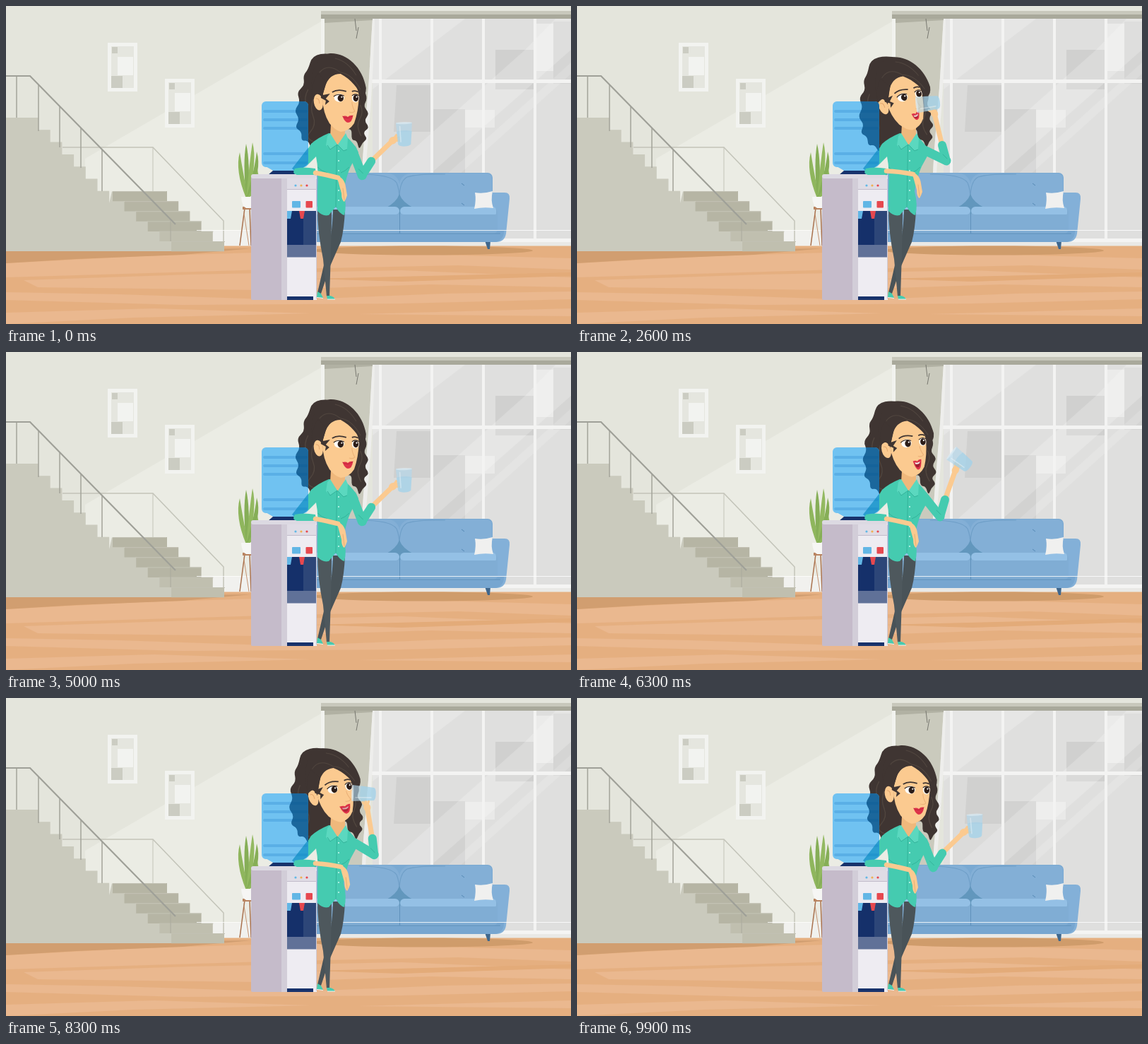
Recreate the animation shown at these times as an HTML page with a canvas. Size 800 px wide and 450 px high, loop 10 s.

```html
<!DOCTYPE html>
<html lang="en">
<head>
<meta charset="utf-8">
<title>Water break</title>
<style>
html, body { margin: 0; width: 100%; height: 100%; overflow: hidden; background: #e4e5dc; }
canvas { display: block; width: 800px; height: 450px; }
</style>
</head>
<body>
<canvas id="stage" width="800" height="450"></canvas>
<script>
const stage = document.getElementById('stage').getContext('2d');
let g = stage;

// --- drawing helpers ---
function rect(x1, y1, x2, y2, color, r = 0) {
  g.fillStyle = color;
  g.beginPath();
  g.roundRect(x1, y1, x2 - x1, y2 - y1, r);
  g.fill();
}
function poly(p, color) {
  g.fillStyle = color;
  g.beginPath();
  for (let i = 0; i < p.length; i += 2) g.lineTo(p[i], p[i + 1]);
  g.fill();
}
function line(p, color, w = 1) {
  g.strokeStyle = color;
  g.lineWidth = w;
  g.beginPath();
  for (let i = 0; i < p.length; i += 2) g.lineTo(p[i], p[i + 1]);
  g.stroke();
}
function oval(x, y, rx, ry, color, a = 0) {
  g.fillStyle = color;
  g.beginPath();
  g.ellipse(x, y, rx, ry, a, 0, 7);
  g.fill();
}
// closed smooth outline through the midpoints of a polygon
function blob(p, color) {
  const n = p.length / 2, at = i => [p[(i % n) * 2], p[(i % n) * 2 + 1]];
  const mid = (a, b) => [(a[0] + b[0]) / 2, (a[1] + b[1]) / 2];
  g.fillStyle = color;
  g.beginPath();
  g.moveTo(...mid(at(0), at(1)));
  for (let i = 1; i <= n; i++) g.quadraticCurveTo(...at(i), ...mid(at(i), at(i + 1)));
  g.fill();
}
function path(d, color, w) {
  const p = new Path2D(d);
  if (w) { g.strokeStyle = color; g.lineWidth = w; g.stroke(p); }
  else { g.fillStyle = color; g.fill(p); }
}
// turn about (x, y) and shift by (dx, dy)
function around(x, y, deg, dx, dy, draw) {
  g.save();
  g.translate(x + dx, y + dy);
  g.rotate(deg * Math.PI / 180);
  g.translate(-x, -y);
  draw();
  g.restore();
}

// --- room ---
function picture(x, y) {
  rect(x, y, x + 42, y + 69, '#f2f3f0');
  rect(x + 5, y + 5, x + 37, y + 64, '#e5e6df');
  rect(x + 6, y + 6, x + 14, y + 15, '#cbccc2');
  rect(x + 14, y + 20, x + 36, y + 46, '#f2f3f0');
  rect(x + 5, y + 47, x + 21, y + 64, '#cbccc2');
}

function windowWall() {
  rect(519, 18, 800, 330, '#dfdfde');
  rect(532, 108, 601, 330, '#dbdbda');
  poly([553, 112, 601, 112, 601, 178, 549, 178], '#d0d0cf');
  rect(605, 146, 650, 236, '#d2d2d1');
  rect(650, 147, 692, 172, '#e9e9e8');
  rect(693, 62, 747, 118, '#d0d0cf');
  rect(751, 25, 775, 92, '#ebebea');
  rect(775, 22, 800, 110, '#d5d5d4');
  poly([519, 18, 650, 18, 519, 118], 'rgba(255,255,255,.2)');
  poly([800, 18, 800, 62, 598, 240, 535, 240, 735, 62, 778, 18], 'rgba(255,255,255,.2)');
  poly([800, 80, 800, 96, 640, 240, 622, 240], 'rgba(255,255,255,.14)');
  for (const x of [528, 601, 674, 747]) rect(x, 18, x + 4, 332, '#f3f3f2');
  rect(515, 104, 800, 109, '#f3f3f2');
  rect(440, 329, 800, 334, '#f4f4f3');
  rect(440, 334, 800, 341, '#e9e9e6');
  path('M451 18H519C516 60 515 100 511 140C508 180 505 210 504 240H451Z', '#cacabd');
  path('M519 18C516 60 515 100 511 140C508 180 505 210 504 240H509C512 190 520 120 522 18Z', '#eeeeec');
  poly([451, 18, 519, 18, 519, 20, 451, 24], '#b1b1a3');
  rect(446, 18, 451, 240, '#f1f2ee');
  line([494, 18, 496, 35], '#77776f');
  line([499, 30, 496, 46], '#77776f');
  rect(446, 7, 800, 13, '#c8c8bc');
  rect(446, 12, 800, 18, '#a9a99b');
}

function stairs() {
  line([80, 200, 208, 200, 308, 304, 308, 347], '#c3c4b9', 1.5);
  line([208, 200, 208, 262], '#c3c4b9');
  g.fillStyle = '#cacabd';
  g.beginPath();
  g.moveTo(0, 347);
  g.lineTo(0, 158);
  for (let i = 0; i < 7; i++) {
    const y = 158 + i * 17.3;
    g.lineTo(46 + i * 16.7, y);
    g.lineTo(46 + i * 16.7, y + 17.3);
  }
  g.lineTo(150, 262);
  g.lineTo(234, 333);
  g.lineTo(234, 347);
  g.fill();
  for (let i = 0; i < 6; i++) {
    const x = 151 + i * 16.6, y = 262 + i * 14.2;
    rect(x, y, x + 77 - i * 0.4, y + 14.3, i < 4 ? '#b6b5a4' : '#c0bfaf');
    line([x, y + 0.5, x + 76, y + 0.5], '#c2c1b3');
  }
  line([233, 304, 233, 333], '#aaaa9d');
  for (const [x, y1, y2] of [[15, 99, 158], [46, 111, 177], [76, 142, 200], [106, 173, 229], [136, 203, 262]])
    line([x, y1, x, y2], '#a3a39a', 1.5);
  line([0, 99, 34, 99, 240, 309], '#9fa098', 2.2);
}

function floor() {
  rect(0, 339.5, 800, 450, '#e5af80');
  poly([0, 364, 190, 354, 420, 347, 800, 357, 800, 373, 640, 367, 400, 372, 0, 384], '#eab88f');
  poly([25, 388, 260, 380, 560, 374, 800, 384, 800, 398, 600, 394, 360, 402, 45, 398], '#eab88f');
  poly([0, 405, 160, 408, 400, 416, 620, 407, 800, 404, 800, 415, 560, 421, 250, 423, 0, 416], '#eab88f');
  poly([430, 386, 800, 377, 800, 382, 560, 390], '#e3ab79');
  poly([0, 434, 210, 428, 430, 435, 180, 441, 0, 450], '#eab88f');
  poly([500, 436, 800, 428, 800, 439], '#eab88f');
  poly([0, 347, 348, 343, 250, 352, 100, 358, 0, 364], '#d19e70');
  oval(590, 346, 156, 6.5, '#cf9c6b');
}

function sofa() {
  poly([678, 332, 686, 332, 685, 344, 682, 344], '#3f678d');
  rect(420, 236, 689, 300, '#7aa9d2', 7);
  rect(430, 237, 557, 300, '#83afd6', [4, 16, 20, 4]);
  rect(557, 237, 688, 300, '#83afd6', [16, 7, 8, 20]);
  path('M500 238Q545 238 553 250Q557 260 557 272Q557 248 568 242Q585 237 622 238', '#6f9fc8', 1.2);
  path('M557 266Q553 278 537 286L557 295L578 286Q561 278 557 266', '#6297bd');
  line([645, 251, 649, 254], '#5689b5');
  line([645, 279, 649, 282], '#5689b5');
  path('M663 275Q670 264 690 264H706Q714 264 713 273L708 322Q706 334 694 334H663Z', '#83b0d8');
  rect(430, 318, 705, 334, '#77a6d0', [0, 0, 14, 0]);
  rect(430, 285, 557, 322, '#80add4', [6, 10, 4, 0]);
  rect(558, 285, 696, 322, '#80add4', [10, 8, 6, 4]);
  rect(430, 284, 557, 295, '#94c0e5', [6, 10, 8, 0]);
  rect(558, 284, 694, 295, '#94c0e5', [10, 8, 2, 8]);
  line([557.5, 294, 557.5, 322], '#5f91bb');
  line([440, 322, 700, 322], '#5f91bb');
  path('M664 264Q676 266 689 262Q686 275 690 286Q676 284 663 287Q666 275 664 264', '#f0f0ef');
  line([270, 317.5, 800, 317.5], 'rgba(255,255,255,.8)', 1.2);
}

function plant() {
  const leaf = (x, y, bend, color) =>
    path(`M340 272Q${x - 6 + bend} ${y + 26} ${x} ${y}Q${x + 5 + bend} ${y + 26} 343 272Z`, color);
  leaf(331, 207, -1, '#8fb65d');
  leaf(340, 195, 1, '#86ae57');
  leaf(349, 193, 2, '#93b961');
  leaf(355, 206, 3, '#86ae57');
  leaf(356, 232, 2, '#8fb65d');
  line([338, 286, 331, 339], '#a8704c', 1.5);
  line([345, 286, 347, 339], '#a8704c', 1.5);
  line([337, 294, 344, 339], '#c59473', 1);
  rect(335, 284, 354, 288, '#b98460');
  path('M333 270H354V286H340Q334 284 333 270', '#f6f6f4');
}

function room() {
  rect(0, 0, 800, 450, '#e4e5dc');
  poly([446, 22, 446, 340, 112, 340, 112, 216], '#ebece4');
  rect(270, 318, 450, 340, '#f1f1ee');
  picture(144, 52);
  picture(225, 103);
  windowWall();
  floor();
  stairs();
  sofa();
  plant();
}

// --- cooler ---
function bottlePath() {
  const p = new Path2D();
  p.roundRect(362, 135, 66, 93, 6);
  p.addPath(new Path2D('M366 226H426L412 234H380Z'));
  return p;
}
const bottleShape = bottlePath();

function bottle() {
  g.fillStyle = '#70c2f1';
  g.fill(bottleShape);
  for (const y of [147, 159, 171, 207, 220]) rect(364, y, 427, y + 4, '#5aafe6', 2);
  path('M378 233H413L420 239H371Z', '#17326c');
}

function cabinet() {
  rect(347, 239, 398, 416, '#c5bbca', [4, 0, 0, 2]);
  rect(390, 242, 398, 416, '#d2cdd8');
  rect(398, 239, 440, 416, '#eeecf2');
  rect(347, 238, 440, 244, '#dcd9e2', 3);
  rect(398, 244, 440, 259, '#dfdce5');
  line([398, 259.5, 440, 259.5], '#c2bccb');
  oval(410, 254, 1.6, 1.6, '#62b8e6');
  oval(418, 254, 1.6, 1.6, '#efb052');
  oval(426, 254, 1.6, 1.6, '#e8474f');
  rect(405, 276, 417, 285.5, '#62b6e5', 1);
  rect(424.5, 276, 434, 285.5, '#e6484f', 1);
  rect(398, 290, 421, 338, '#15306a');
  rect(421, 290, 439, 338, '#2d4678');
  rect(398, 338, 439, 355.5, '#607198');
  poly([398, 290, 405, 290, 403, 301, 398, 301], '#62b6e5');
  poly([415, 290, 423, 290, 421, 301, 417, 301], '#e6484f');
  rect(398, 411, 435, 416, '#17326c');
  line([439.5, 245, 439.5, 414], '#d0cbd8');
}

// --- motion ---
const clamp = x => Math.min(1, Math.max(0, x));
const ease = x => { x = clamp(x); return x * x * (3 - 2 * x); };
const REST = 0.05;

// 0 = arm held out, 1 = drinking
function lift(ms) {
  let t = ms % 5000;
  if (t < 500) t += 5000;
  if (t >= 4300) return REST * (1 - ease((t - 4300) / 1100));
  if (t >= 2950) return 1 - (1 - REST) * ease((t - 2950) / 1350);
  return ease((t - 600) / 1400);
}
const STOPS = [0, 0.5, 0.82, 1];
function key(u, ...v) {
  let i = 0;
  while (i < 2 && u > STOPS[i + 1]) i++;
  return v[i] + (v[i + 1] - v[i]) * (u - STOPS[i]) / (STOPS[i + 1] - STOPS[i]);
}

// --- woman ---
const SKIN = '#fbca90', HAIR = '#3f3532', STRAND = '#51463f', SHIRT = '#45cbb0', SHADE = '#33b39a', PANTS = '#4e585d';
const BACK_HAIR = [458, 66, 434, 70, 428, 90, 421, 98, 423, 112, 412, 122, 417, 136, 408, 148, 416, 160,
  409, 172, 419, 178, 418, 191, 428, 190, 432, 202, 440, 194, 449, 201, 456, 186, 475, 178, 490, 172,
  489, 190, 497, 190, 500, 204, 505, 193, 512, 188, 505, 179, 515, 172, 507, 162, 515, 152, 506, 142,
  512, 131, 507, 118, 505, 100, 490, 78];

function backHair(u, color) {
  around(472, 185, -6 * u, -7 * u, 1.5 * u, () => {
    blob(BACK_HAIR, color);
    if (color !== HAIR) return;
    path('M428 118Q421 130 426 142T421 164T428 184', STRAND, 1.3);
    path('M436 130Q430 144 435 156T431 178T439 193', STRAND, 1.3);
    path('M502 140Q507 150 501 160T503 184', STRAND, 1.3);
  });
}

function legs() {
  path('M463 288L480 288Q479 315 474 334Q466 352 459 368L446 407L441 406L452 358Q462 330 463 288', '#495358');
  path('M441 286H461Q461 320 460 350L458 411H454L449 358Q441 320 441 286', PANTS);
  path('M441 404L446 407L449 413L440 412Z', SHIRT);
  path('M454 410H459Q464 411 466 415H455Z', SHIRT);
  line([440, 412.5, 449, 413.5], '#f3f3f1');
  line([455, 415, 466, 415], '#f3f3f1');
}

function torso() {
  path('M457 180Q442 186 432 195Q426 204 420 219L427 225L439 213Q443 232 441 262V290Q448 298 457 296L467 284Q472 294 479 296Q483 282 478 262Q482 240 488 227L499 207Q494 195 480 183Z', SHIRT);
  line([468.5, 196, 467, 285], SHADE);
  for (let y = 205; y < 285; y += 14) oval(471, y, 0.9, 0.9, '#d9fff5');
  path('M441 228Q447 234 455 236M486 228Q480 234 474 236', SHADE, 1);
  path('M460 168H480V184L470 197L459 184Z', '#efb87c');
  path('M459 180L455 184L453 197L459 203L469 196Z', '#5bd8bf');
  path('M481 180L484 187L483 203L478 205L470 196Z', '#5bd8bf');
  path('M455 197L459 203L469 196L478 205L483 203', SHADE, 1);
}

function restingArm(u) {
  const y = key(u, 0, 0, -4, -5), x = key(u, 0, 1, 4, 6);
  g.lineCap = g.lineJoin = 'round';
  path('M409 230Q420 227 438 230L439 239H412Q404 237 409 230', SHIRT);
  line([438, 235, 438, 239], SHADE);
  path(`M438 ${236 + y * 0.5}Q455 ${239 + y} ${470 + x} ${243 + y}`, SKIN, 6.5);
  path(`M${467 + x} ${240 + y}Q${479 + x} ${242 + y} ${481 + x} ${256 + y}L${483 + x} ${268 + y}Q${481 + x} ${274 + y} ${479 + x} ${277 + y}Q${475 + x} ${275 + y} ${475 + x} ${265 + y}L${470 + x} ${247 + y}Z`, SKIN);
  path(`M${477 + x} ${258 + y}L${479 + x} ${274 + y}`, '#e2a76d', 0.8);
}

function raisedArm(u) {
  const elbow = [key(u, 504, 514, 521, 523), key(u, 240, 233, 222, 219)];
  const cuff = [key(u, 517, 521, 519, 517), key(u, 220, 209, 199, 197)];
  const hand = [key(u, 548, 536, 512, 506), key(u, 191, 167, 155, 152)];
  const cup = [key(u, 564.5, 543, 508, 497), key(u, 182.5, 153, 135, 138)];
  const tilt = key(u, 0, -52, -86, -97);
  g.lineCap = g.lineJoin = 'round';
  line([...cuff, ...hand], SKIN, 7);
  line([490, 203, ...elbow], SHIRT, 13);
  line([...elbow, ...cuff], SHIRT, 12);
  path(`M${elbow[0] - 5} ${elbow[1] - 9}L${elbow[0] + 1} ${elbow[1] - 3}`, SHADE, 1);
  const reach = Math.atan2(cup[1] - hand[1], cup[0] - hand[0]);
  oval(hand[0], hand[1], 6, 5, SKIN, reach);
  for (const s of [-4, 0, 4])
    line([hand[0], hand[1], hand[0] + 9 * Math.cos(reach + s * 0.12), hand[1] + 9 * Math.sin(reach + s * 0.12)], SKIN, 3.5);
  g.lineCap = 'butt';
  around(0, 0, tilt, ...cup, () => {
    path('M-11.5 -16.5H11.5L9 14Q8 17 0 17T-9 14Z', 'rgba(178,216,238,.62)');
    path('M-10.8 -4Q0 -7 10.8 -4L9 14Q8 17 0 17T-9 14Z', 'rgba(150,204,232,.42)');
    oval(0, -16, 11.5, 1.6, 'rgba(225,238,245,.6)');
    line([-6, -12, -5, 11], 'rgba(255,255,255,.35)', 1.6);
  });
}

function mouth(u) {
  const w = key(u, 15, 12, 16, 11) / 2, h = key(u, 9, 13, 12, 10);
  const open = key(u, 0, 1, 0.6, 0.8);
  g.save();
  g.translate(484, 156);
  path(`M${-w} 0Q${-w * 0.3} -1 0 1Q${w * 0.4} -2 ${w} -1Q${w * 0.8} ${h} 0 ${h}Q${-w * 0.6} ${h * 0.9} ${-w} 0`, '#df3349');
  g.globalAlpha = open;
  path(`M${-w * 0.65} 2Q0 4 ${w * 0.7} 1.5Q${w * 0.5} ${h * 0.75} 0 ${h * 0.75}T${-w * 0.65} 2`, '#9c1f30');
  path(`M${-w * 0.6} 2Q0 4 ${w * 0.65} 1.5L${w * 0.5} 4Q0 6 ${-w * 0.5} 4.5Z`, '#f7efee');
  g.globalAlpha = 1 - open;
  path(`M${-w} 0Q0 6 ${w} -1`, '#b8243a', 0.8);
  g.restore();
}

function face(u) {
  path('M470 93Q451 102 448 130Q449 152 458 166Q466 176 474 178Q486 177 493 166Q499 150 500 128Q498 104 470 93', SKIN);
  oval(472, 130, 7.2, 5.8, '#fffdfa');
  oval(495, 130.5, 5, 5.8, '#fffdfa');
  oval(474, 130.5, 4.2, 4.8, '#2c1d18');
  oval(495.5, 130.5, 3.8, 4.8, '#2c1d18');
  oval(475.5, 128.8, 1.1, 1.1, '#fff');
  oval(496.7, 128.8, 1.1, 1.1, '#fff');
  path('M464 128Q470 123 479 127M490 127Q495 123 500 127', '#2c2321', 1.1);
  path('M462 122Q470 117 482 121M490 121Q495 119 499 122', HAIR, 1.8);
  path('M490 136Q490 142 494 149Q491 152 486 150', '#eab077', 1);
  mouth(u);
}

function head(u) {
  around(472, 175, -14 * u, 0, -2 * u, () => face(u));
  around(472, 185, -8 * u, 0, 3 * u, () =>
    path('M434 130C429 92 441 69 459 67C482 66 505 86 510 116Q510 126 504 129C499 117 489 104 474 96Q458 96 452 113L447 132L441 138Z', HAIR));
  around(472, 175, -14 * u, 0, -2 * u, () => {
    oval(442.5, 136, 6.5, 11.5, SKIN, -0.15);
    path('M439 131Q444 130 444 138', '#e2a76d', 1);
    path('M447 116L449 126L459 124L453 131L458 135L452 140L453 134L446 130Z', HAIR);
  });
  around(472, 185, -8 * u, 0, 3 * u, () => {
    path('M434 128Q432 108 442 95L454 108L448 127Q442 120 434 128', HAIR);
    path('M474 94Q456 80 444 94M474 94Q490 96 502 118M466 74Q484 78 496 98', STRAND, 1);
  });
}

function tintThroughBottle(u) {
  g.save();
  g.clip(bottleShape);
  backHair(u, 'rgba(0,76,130,.76)');
  poly([430, 198, 405, 230, 412, 236, 430, 222], 'rgba(0,135,190,.62)');
  g.restore();
}

function draw(ms) {
  const u = lift(ms);
  stage.drawImage(backdrop, 0, 0);
  backHair(u, HAIR);
  legs();
  torso();
  head(u);
  bottle();
  tintThroughBottle(u);
  cabinet();
  restingArm(u);
  raisedArm(u);
}

const backdrop = document.createElement('canvas');
backdrop.width = 800;
backdrop.height = 450;
g = backdrop.getContext('2d');
room();
g = stage;

const start = performance.now();
function tick() {
  draw((performance.now() - start) % 10000);
  requestAnimationFrame(tick);
}
tick();
</script>
</body>
</html>
```
